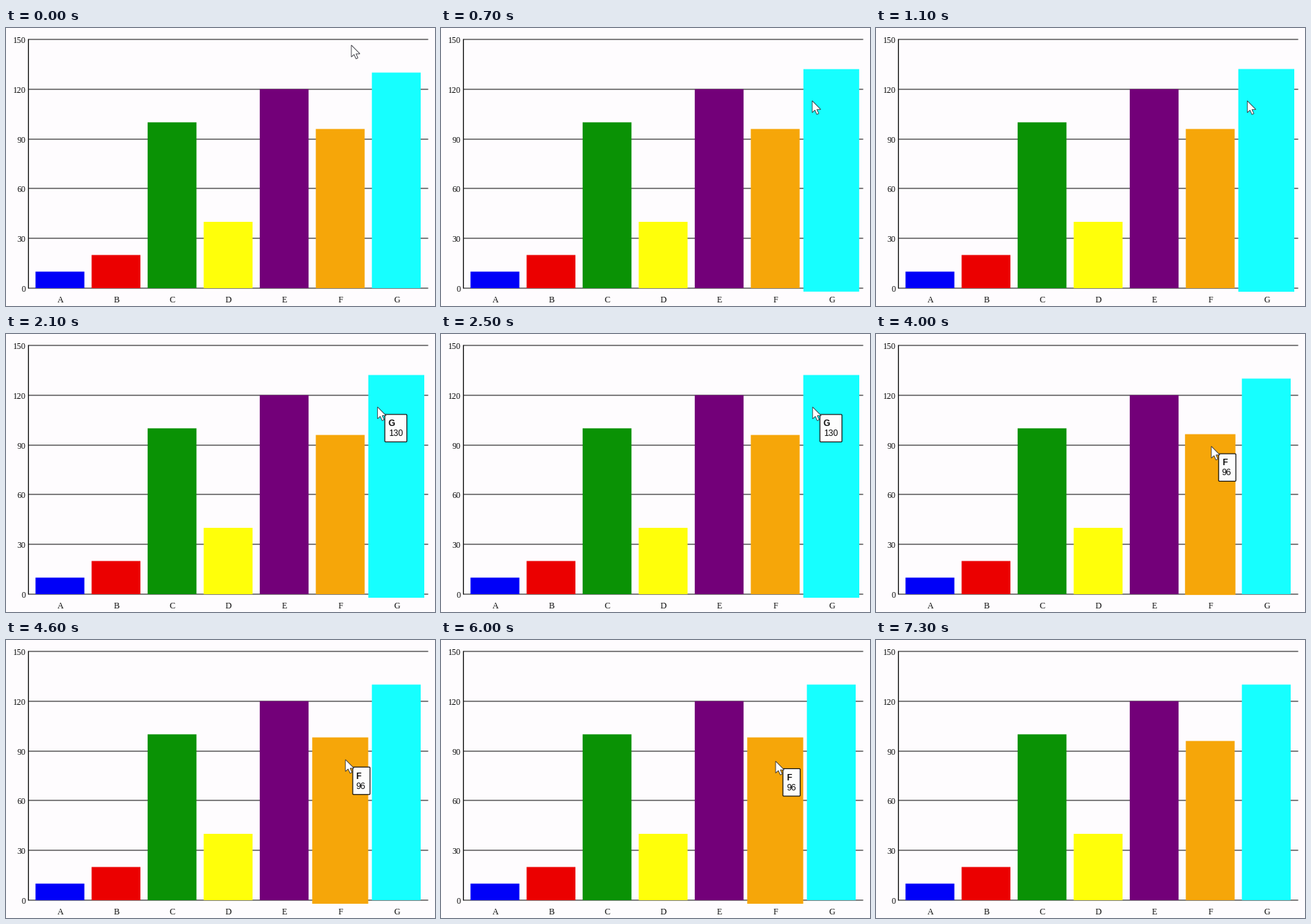
A matplotlib script that plays this animation: 600 by 390 pixels, repeating every 7400 ms.

```python
import numpy as np
import matplotlib.pyplot as plt
from matplotlib.animation import FuncAnimation
from matplotlib.patches import FancyBboxPatch, Polygon, Rectangle

W, H, DPI = 600, 390, 100
FRAMES, STEP = 74, 100
PX = 72 / DPI

LEFT, RIGHT, TOP, BASE = 31.4, 590.5, 16, 365
FIRST, PITCH, BAR_W = 41.3, 78.4, 68.3
GROW, GROW_MS, TIP_LAG = 5, 500, 60

NAMES = "ABCDEFG"
VALUES = [10, 20, 100, 40, 120, 96, 130]
COLORS = ["#0000f8", "#eb0000", "#0a9205", "#ffff0a",
          "#730079", "#f6a609", "#16ffff"]

# Pointer stops: time in ms, x, y
STOPS = np.array([(0, 483, 24), (400, 519, 102), (3100, 520, 102.5),
                  (3400, 504, 110.5), (4000, 469, 157.5), (4400, 477, 167),
                  (5200, 468, 170), (6400, 468, 170), (6600, 476, 172)])
POINTER_END = 6700

# Hovered bar: pointer enters, tooltip opens, pointer leaves
HOVERS = {"G": (300, 1400, 3190), "F": (3810, 3900, 6630)}

ARROW = np.array([(0, 0), (0, 16.6), (3.8, 13.2), (6.5, 19.2),
                  (9.2, 18), (6.6, 12.2), (12, 12.2)])


def y_of(value):
    return BASE - (BASE - TOP) * value / 150


def ease(u):
    u = min(max(u, 0), 1)
    return 4 * u ** 3 if u < 0.5 else 1 - 4 * (1 - u) ** 3


def bar_box(index, t):
    grow = 0
    if NAMES[index] in HOVERS:
        enter, _, leave = HOVERS[NAMES[index]]
        grow = GROW * (ease((t - enter) / GROW_MS) - ease((t - leave) / GROW_MS))
    x, y = FIRST + PITCH * index, y_of(VALUES[index])
    return x - grow, y - grow, BAR_W + 2 * grow, BASE - y + 2 * grow


def open_tip(t):
    for name, (_, start, leave) in HOVERS.items():
        if start <= t < leave + TIP_LAG:
            return name
    return None


def pointer_at(t):
    return np.array([np.interp(t, STOPS[:, 0], STOPS[:, k]) for k in (1, 2)])


fig = plt.figure(figsize=(W / DPI, H / DPI), dpi=DPI, facecolor="#fefcfe")
ax = fig.add_axes([0, 0, 1, 1])
ax.set_xlim(0, W)
ax.set_ylim(H, 0)
ax.axis("off")


def label(x, y, text, family="Liberation Serif", **kw):
    return ax.text(x, y, text, fontsize=12 * PX, family=family,
                   color="#080808", va="baseline", **kw)


def line(xs, ys, width, zorder):
    ax.plot(xs, ys, color="#080808", lw=width * PX, zorder=zorder,
            solid_capstyle="butt", snap=False)


# Gridlines sit on pixel borders, so each spreads over two soft rows
for value in range(0, 151, 30):
    y = round(y_of(value))
    line([LEFT, RIGHT], [y, y], 1, 1)
    label(27.6, y + 4.6, str(value), ha="right")

bars = []
for i, name in enumerate(NAMES):
    x, y, w, h = bar_box(i, 0)
    bars.append(ax.add_patch(Rectangle((x, y), w, h, fc=COLORS[i], lw=0,
                                       zorder=2, snap=False)))
    label(x + w / 2 + 0.5, 385, name, ha="center")

line([LEFT, LEFT], [TOP - 0.5, BASE + 0.5], 1.3, 3)

tip = FancyBboxPatch((0, 0), 30, 38.5,
                     boxstyle="round,pad=0,rounding_size=1.2",
                     fc="#fdfdfd", ec="#101010", lw=1.2 * PX, zorder=5)
ax.add_patch(tip)
tip_name = label(0, 0, "", family="Liberation Sans", weight="bold", zorder=6)
tip_value = label(0, 0, "", family="Liberation Sans", zorder=6)

arrow = Polygon(ARROW, closed=True, fc="white", ec="#303038", lw=0.85 * PX,
                joinstyle="miter", zorder=7)
ax.add_patch(arrow)


def draw(frame):
    t = frame * STEP
    pos = pointer_at(t)

    for i, bar in enumerate(bars):
        bar.set_bounds(*bar_box(i, t))

    arrow.set_xy(ARROW + pos)
    arrow.set_visible(t < POINTER_END)

    name = open_tip(t)
    for part in (tip, tip_name, tip_value):
        part.set_visible(name is not None)
    if name:
        value = str(VALUES[NAMES.index(name)])
        x, y = pos + (10.2, 10.5)
        tip.set_bounds(x, y, 10.8 + 6.67 * len(value), 38.5)
        tip_name.set_text(name)
        tip_name.set_position((x + 4.8, y + 16.5))
        tip_value.set_text(value)
        tip_value.set_position((x + 4.8, y + 30.5))
    return bars + [tip, tip_name, tip_value, arrow]


anim = FuncAnimation(fig, draw, frames=FRAMES, interval=STEP,
                     repeat=True, repeat_delay=0)
plt.show()
```
